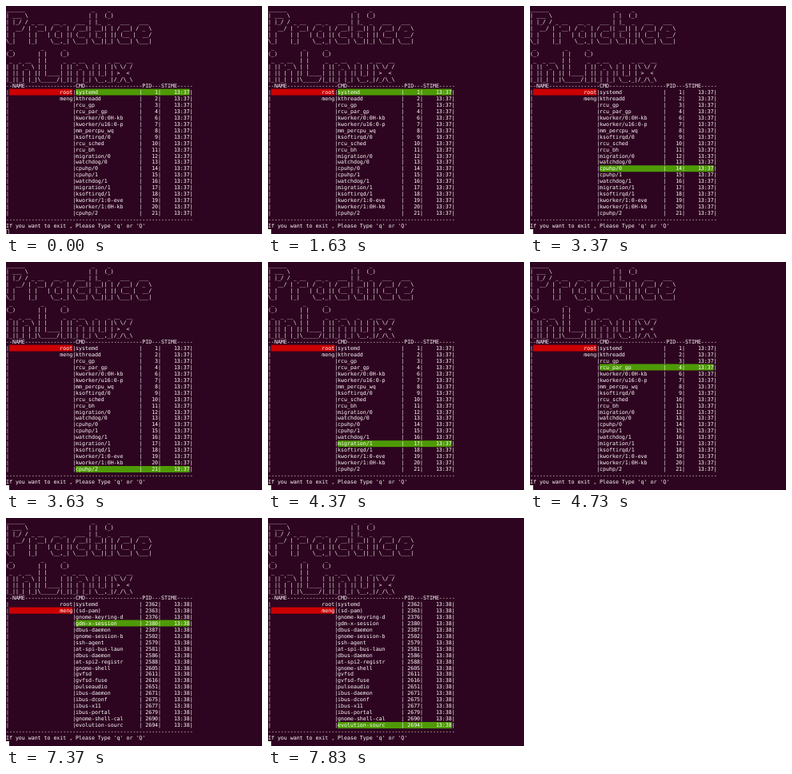
These frames come from a looping animation (320 by 285 pixels, 8000 ms). An HTML page with a canvas:

```html
<!DOCTYPE html>
<html lang="en">
<head>
<meta charset="utf-8">
<title>Process list in a terminal</title>
<style>
html, body { margin: 0; width: 100%; height: 100%; overflow: hidden; background: #2e0520; }
canvas { display: block; }
</style>
</head>
<body>
<canvas id="term" width="320" height="285"></canvas>
<script type="text/plain" id="banner">
______                     _    _
| ___ \                   | |  (_)
| |_/ / _ __   __ _   ___ | |_  _   ___   ___
|  __/ | '__| / _` | / __|| __|| | / __| / _ \
| |    | |   | (_| || (__ | |_ | || (__ |  __/
\_|    |_|    \__,_| \___| \__||_| \___| \___|
 _         _      _
(_)       | |    (_)
 _  _ __  | |     _  _ __   _   _ __  __
| || '_ \ | |    | || '_ \ | | | |\ \/ /
| || | | || |____| || | | || |_| | >  <
|_||_| |_|\_____/|_||_| |_| \__,_|/_/\_\
</script>
<script>
const ctx = document.getElementById('term').getContext('2d');
const BG = '#2e0520', FG = '#ffffff', RED = '#cc0000', GREEN = '#4e9a06';
const CW = 3.96, LH = 7.97, BASE = 6.2;
const LOOP = 8000, TOP = 13, ROWS = 20, REPEAT = 30;

const banner = document.getElementById('banner').textContent.split('\n').slice(1, 13);
const users = ['root', 'meng'];
const header = '--NAME' + '-'.repeat(16) + 'CMD' + '-'.repeat(18) + 'PID---STIME-----';

const parse = (list, time) => list.trim().split(/\s+/).map(s => {
  const [cmd, pid] = s.split('=');
  return { cmd, pid, time };
});

const rootCmds = `systemd kthreadd rcu_gp rcu_par_gp kworker/0:0H-kb kworker/u16:0-p
  mm_percpu_wq ksoftirqd/0 rcu_sched rcu_bh migration/0 watchdog/0 cpuhp/0 cpuhp/1
  watchdog/1 migration/1 ksoftirqd/1 kworker/1:0-eve kworker/1:0H-kb cpuhp/2`;

const lists = [
  parse(rootCmds, '13:37').map((p, i) => ({ ...p, pid: String(i < 4 ? i + 1 : i + 2) })),
  parse(`systemd=2362 (sd-pam)=2363 gnome-keyring-d=2376 gdm-x-session=2380
    dbus-daemon=2387 gnome-session-b=2502 ssh-agent=2579 at-spi-bus-laun=2581
    dbus-daemon=2586 at-spi2-registr=2588 gnome-shell=2605 gvfsd=2611
    gvfsd-fuse=2616 pulseaudio=2651 ibus-daemon=2671 ibus-dconf=2675
    ibus-x11=2677 ibus-portal=2679 gnome-shell-cal=2690 evolution-sourc=2694`, '13:38')
];

// One key press, then auto-repeat after a delay.
function held(t, press, repeat) {
  if (t < press) return 0;
  if (t < repeat) return 1;
  return Math.min(ROWS - 1, 2 + Math.floor((t - repeat) / REPEAT));
}

function selectedRow(t) {
  if (t < 3790) return held(t, 2566, 3066);
  if (t < 5466) return ROWS - 1 - held(t, 3799, 4299);
  if (t < 6499) return -1;
  return held(t, 6832, 7321);
}

function cursorState(t) {
  if (t < 1499) return 'hollow';
  const off = (t >= 2099 && t < 2566) || (t >= 6066 && t < 6232);
  return off ? 'off' : 'solid';
}

function fill(col, row, cols, color) {
  ctx.fillStyle = color;
  ctx.fillRect(col * CW, row * LH, cols * CW, LH);
}

function print(text, row) {
  ctx.fillStyle = FG;
  for (let i = 0; i < text.length; i++) {
    if (text[i] !== ' ') ctx.fillText(text[i], i * CW * 2, (row * LH + BASE) * 2);
  }
}

function drawCursor(state) {
  const y = 35 * LH;
  if (state === 'solid') fill(0, 35, 1, FG);
  if (state === 'hollow') {
    ctx.strokeStyle = FG;
    ctx.lineWidth = 0.5;
    ctx.strokeRect(0.25, y + 0.25, CW - 0.5, LH - 0.5);
  }
}

function draw(t) {
  const user = t < 6199 ? 0 : 1;
  const row = selectedRow(t);

  ctx.setTransform(1, 0, 0, 1, 0, 0);
  ctx.fillStyle = BG;
  ctx.fillRect(0, 0, 320, 285);
  fill(1, TOP + user, 20, RED);
  if (row >= 0) fill(22, TOP + row, 36, GREEN);
  drawCursor(cursorState(t));

  // Half scale keeps fractional glyph positions.
  ctx.scale(0.5, 0.5);
  ctx.font = '13.16px "DejaVu Sans Mono", monospace';
  ctx.textRendering = 'geometricPrecision';
  banner.forEach(print);
  print(header, TOP - 1);
  lists[user].forEach((p, i) => {
    const name = (users[i] || '').padStart(20);
    print(`|${name}|${p.cmd.padEnd(20)}|${p.pid.padStart(5)}|${p.time.padStart(9)}|`, TOP + i);
  });
  print('-'.repeat(59), TOP + ROWS);
  print("If you want to exit , Please Type 'q' or 'Q'", TOP + ROWS + 1);
}

// The screen refreshes 30 times a second.
function tick() {
  const t = performance.now() % LOOP;
  draw(Math.floor((t + 3.5) * 0.03) / 0.03);
  requestAnimationFrame(tick);
}
tick();
</script>
</body>
</html>
```
